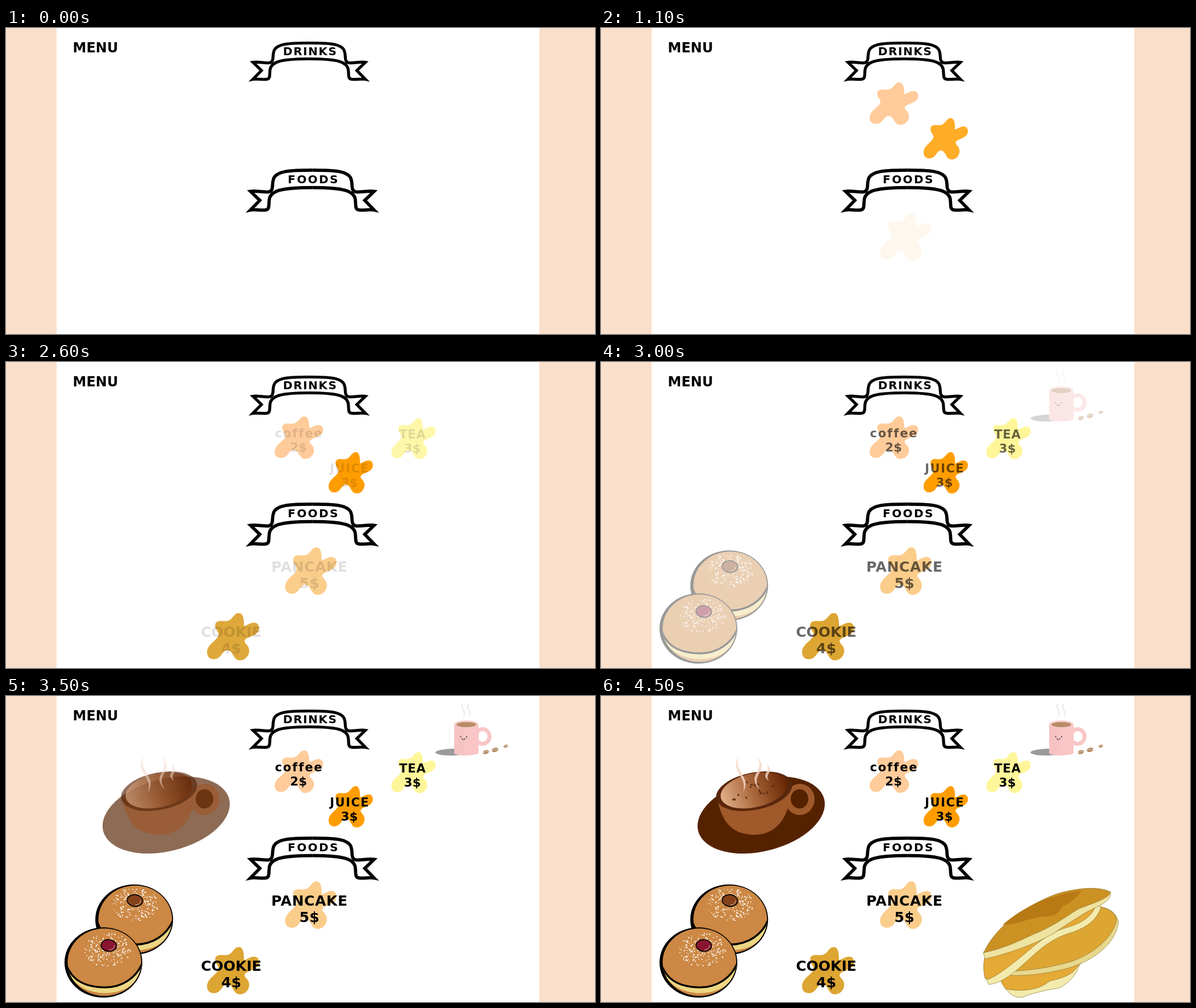
These frames come from a looping animation (1037 by 540 pixels, 5500 ms). An HTML page with a canvas:

```html
<!DOCTYPE html>
<html lang="en">
<head>
<meta charset="utf-8">
<title>Menu</title>
<style>
html, body { margin: 0; width: 100%; height: 100%; overflow: hidden; background: #fff; }
canvas { display: block; }
</style>
</head>
<body>
<canvas id="stage" width="1037" height="540"></canvas>
<script>
const W = 1037, H = 540, LOOP = 5500;
const stage = document.getElementById('stage').getContext('2d');
const TAU = Math.PI * 2;
const clamp = v => Math.max(0, Math.min(1, v));

function layer(draw) {
  const canvas = document.createElement('canvas');
  canvas.width = W;
  canvas.height = H;
  draw(canvas.getContext('2d'));
  return canvas;
}

function ellipse(c, color, x, y, rx, ry, angle = 0) {
  c.fillStyle = color;
  c.beginPath();
  c.ellipse(x, y, rx, ry, angle, 0, TAU);
  c.fill();
}

function stroke(c, color, path, width) {
  c.strokeStyle = color;
  c.lineWidth = width;
  c.stroke(new Path2D(path));
}

function shape(c, color, path, outline) {
  c.fillStyle = color;
  c.fill(new Path2D(path));
  if (outline) stroke(c, outline, path, 0.7);
}

function text(c, str, x, y, size, spacing = 0) {
  c.font = `bold ${size}px "DejaVu Sans", sans-serif`;
  c.textAlign = 'center';
  c.letterSpacing = spacing + 'px';
  c.fillStyle = '#000';
  c.fillText(str, x + spacing / 2, y);
}

function randomFrom(seed) {
  return () => (seed = (seed * 16807) % 2147483647) / 2147483647;
}

// Calls place(x, y, rand) for seeded random spots inside an ellipse.
function scatter(count, seed, rx, ry, power, place) {
  const rand = randomFrom(seed);
  for (let i = 0; i < count; i++) {
    const angle = rand() * TAU, reach = Math.pow(rand(), power);
    place(Math.cos(angle) * reach * rx, Math.sin(angle) * reach * ry, rand);
  }
}

// Right half of a ribbon; the left half is its mirror image.
const HALF_RIBBON = 'M0 3C30 3 60 3 62.5 19C65 26 61 36 70 38C78 39 90 35.5 99 37' +
  'L84 51.5L99 67C92 65.5 82 68 75 67C68 66 70 60 69 52C68.5 36 50 31 0 31';

function banner(c, title, x, y, scale, spacing) {
  for (const side of [-1, 1]) {
    c.save();
    c.translate(x, y);
    c.scale(side * scale, scale);
    stroke(c, '#000', HALF_RIBBON, 5.2);
    c.restore();
  }
  text(c, title, x + 1, y + 24 * scale, 20, spacing);
}

const backdrop = layer(c => {
  c.fillStyle = '#fff';
  c.fillRect(0, 0, W, H);
  c.fillStyle = '#fadfcb';
  c.fillRect(0, 0, 89, H);
  c.fillRect(939, 0, 98, H);
  text(c, 'MENU', 157.5, 43, 24);
  banner(c, 'DRINKS', 533.75, 23.5, 1, 1.6);
  banner(c, 'FOODS', 539.25, 247.5, 1.1, 2.4);
});

// Five-lobed splash in a 90 by 84 box
const SPLASH = 'M55 0C62 0 64 9 64 23C68 23 74 17 81 17C87 17 90 21 90 27C90 42 65 42 65 50' +
  'C65 55 73 57 73 67C73 76 66 84 57 84C44 84 46 66 35 66C26 66 25 82 12 82C4 82 0 77 0 70' +
  'C0 54 20 48 20 38C20 33 14 30 14 22C14 17 18 14 23 14C28 14 30 15 35 14C45 12 46 0 55 0Z';

const dishes = [
  { name: 'coffee', price: '2$', color: '#ffcb9a', x: 473, y: 96, w: 85.5, h: 75, from: 0, to: 600,
    textX: 515, textY: 133, size: 21, spacing: 1.9 },
  { name: 'JUICE', price: '3$', color: '#ff9d00', x: 568, y: 159, w: 78, h: 73, from: 300, to: 1250,
    textX: 604.5, textY: 195, size: 21, spacing: 1.5 },
  { name: 'PANCAKE', price: '5$', color: '#fbcd8b', x: 491.5, y: 327, w: 90.5, h: 84, from: 1000, to: 1700,
    textX: 534, textY: 369.5, size: 25, spacing: 0.6 },
  { name: 'COOKIE', price: '4$', color: '#dda532', x: 354, y: 443, w: 91.5, h: 83.5, from: 1500, to: 2650,
    textX: 396.5, textY: 485, size: 25, spacing: 0 },
  { name: 'TEA', price: '3$', color: '#fef699', x: 678.5, y: 99, w: 78, h: 72.5, from: 1900, to: 2750,
    textX: 715.5, textY: 135, size: 21, spacing: 0.8 }
];

for (const d of dishes) {
  d.image = layer(c => {
    c.translate(d.x, d.y);
    c.scale(d.w / 90, d.h / 84);
    shape(c, d.color, SPLASH);
  });
}

const labels = layer(c => {
  for (const d of dishes) {
    text(c, d.name, d.textX, d.textY, d.size, d.spacing);
    text(c, d.price, d.textX, d.textY + d.size * 1.17, d.size, 0.3);
  }
});

const mug = layer(c => {
  ellipse(c, '#9a9a9a', 787, 99, 31, 6, -0.02);
  c.lineCap = 'round';
  for (const x of [804, 814]) {
    stroke(c, '#e6e2e2', `M${x} 14c-6 9 6 11 1 24m0 -24c-6 9 6 11 2 20`, 1);
  }
  c.strokeStyle = '#f9c6c6';
  c.lineWidth = 7;
  c.beginPath();
  c.ellipse(839, 71.5, 12.3, 13, 0, 0, TAU);
  c.stroke();
  shape(c, '#f9c5c5', 'M789 49V100Q789 104 810 105Q832 104 832 100V49Z');
  shape(c, '#f6c2c1', 'M789 49V100Q789 104 807 105V49Z');
  ellipse(c, '#f9cfcf', 810.5, 49.5, 21.5, 6.5);
  ellipse(c, '#b98b68', 810.5, 50.5, 17.5, 4.5);
  for (const x of [800.5, 811]) ellipse(c, '#333', x, 72, 1.1, 1.1);
  stroke(c, '#333', 'M802.5 75q3 4 6 0', 1.1);
  for (const [x, y, r] of [[845, 99, 5.5], [861, 95, 6], [880, 88.5, 4]]) {
    ellipse(c, '#b08660', x, y, r, r * 0.6, -0.3);
    stroke(c, '#f3e4d4', `M${x - r + 1} ${y + 1}q${r} -3 ${2 * r - 2} -2`, 0.9);
  }
});

function bun(c, x, y, filling, fillingX, fillingY, sugarX, sugarY, seed) {
  const dome = 'M-66 2C-56 30-36 43 2 44C34 44 58 26 68 2';
  c.save();
  c.translate(x, y);
  ellipse(c, '#000', 0, 0, 68.5, 62);
  c.beginPath();
  c.ellipse(1.8, -0.5, 64.8, 59.5, 0, 0, TAU);
  c.clip();
  c.fillStyle = '#cc8844';
  c.fillRect(-70, -65, 140, 130);
  shape(c, '#ecd784', dome + 'V14C58 40 34 54 4 54C-30 54-54 38-66 12Z');
  stroke(c, '#000', dome, 3.4);
  scatter(240, seed, 41, 30, 0.6, (dx, dy, rand) => {
    const r = 0.6 + rand() * 0.6;
    ellipse(c, '#fff', sugarX + dx, sugarY + dy, r, r);
  });
  ellipse(c, '#000', fillingX, fillingY, 14.5, 11.2, 0.1);
  ellipse(c, filling, fillingX, fillingY, 12.8, 9.5, 0.1);
  c.lineCap = 'round';
  stroke(c, '#e3c3a8', `M${fillingX + 1} ${fillingY + 8}q9 -1 9 -8`, 1);
  c.restore();
}

const buns = layer(c => {
  bun(c, 225.7, 394.5, '#85421a', 1.3, -33.5, 2.5, -27, 71);
  bun(c, 171.5, 470.3, '#8a1530', 9.5, -30, 7.5, -22, 905);
});

// Tapering wisp that sways once on its way down.
function wisp(c, x, y, height, drift, sway) {
  c.fillStyle = '#f3d8c6';
  for (let s = 0; s <= 1; s += 0.5 / height) {
    const w = 0.5 + 4.5 * Math.sin(Math.PI * s);
    c.fillRect(x + drift * s - sway * Math.sin(TAU * s) - w / 2, y + height * s, w, 0.6);
  }
}

// Coffee cup: parts fade separately so they show through each other.
const cup = [
  c => ellipse(c, '#552200', 282, 210, 114.5, 63.8, -0.25),
  c => {
    ellipse(c, '#a0592a', 350, 182.5, 26, 27.5, 0.1);
    shape(c, '#a0592a', 'M205 182C212 215 224 244 270 245C306 244 332 220 335 160Z');
  },
  c => {
    ellipse(c, '#552200', 349.5, 181.5, 15.5, 17);
    ellipse(c, '#5a270c', 269.5, 168, 68, 33, -0.2);
  },
  c => {
    const coffee = c.createLinearGradient(213, 188, 322, 148);
    coffee.addColorStop(0, '#e2b08a');
    coffee.addColorStop(0.5, '#a8663a');
    coffee.addColorStop(1, '#6a2805');
    ellipse(c, coffee, 269, 166.5, 59.5, 30, -0.22);
  },
  c => {
    wisp(c, 241, 108, 60, 10, 4);
    wisp(c, 275, 107, 56, 3, -5);
    wisp(c, 292, 121, 28, 3, -3);
  }
].map(layer);

const crumbs = layer(c => {
  scatter(14, 37, 40, 18, 0.5, (dx, dy, rand) => {
    c.save();
    c.translate(266 + dx, 166 + dy - dx * 0.2);
    c.rotate(rand() * 3);
    c.fillStyle = '#5a260b';
    c.fillRect(-2, -1.2, 3 + rand() * 2, 2.4);
    c.restore();
  });
});

// Bottom of the stack first: cream rim, then browned face.
const pancakes = [
  { from: 3750, to: 4250, face: '#e5a935', rim: '#f3ebae',
    rimPath: 'M698 478C698 495 706 508 714 518Q724 533 741 532C765 522 790 518 808 515Q834 500 842 476Z',
    facePath: 'M698 476L757 436L880 440Q845 470 830 488Q815 498 790 503C770 520 740 522 712 517Q700 500 698 476Z' },
  { from: 3750, to: 4250, face: '#dda532', rim: '#e8d88e',
    rimPath: 'M880 372Q905 376 911 398C908 430 880 460 830 478C790 490 750 494 722 493L700 477L812 413Z',
    facePath: 'M880 372Q904 378 908 394C902 425 872 452 830 468C790 480 750 485 715 486L700 477L757 433L812 413Q826 380 880 372Z' },
  { from: 3800, to: 4300, face: '#e5a935', rim: '#f3ebae',
    rimPath: 'M862 368Q880 364 880 374C872 396 855 408 830 417C790 428 770 450 745 472C725 490 705 507 683 509L676 496Z',
    facePath: 'M676 498C670 470 676 450 690 438C730 395 790 360 830 362Q858 362 872 367C866 388 848 400 825 407C785 418 765 440 740 460C715 480 700 492 682 500Z' },
  { from: 4250, to: 4500, face: '#cb9122', rim: '#eee3a0',
    rimPath: 'M673 452L676 464C712 456 760 440 795 420C825 400 850 382 878 370Q900 358 897 346Z',
    facePath: 'M674 453C690 415 735 375 800 350C840 337 880 336 897 346C893 358 870 364 840 376C815 392 790 410 760 421C730 436 705 446 674 453Z',
    glaze: 'M707 404C745 370 795 350 846 343C836 360 822 366 812 372C800 392 790 388 770 390C745 396 730 403 707 404Z' }
];

for (const p of pancakes) {
  p.image = layer(c => {
    shape(c, p.rim, p.rimPath, '#8a7434');
    shape(c, p.face, p.facePath, '#8a7434');
    if (p.glaze) shape(c, '#b87a15', p.glaze);
  });
}

function render(time) {
  const step = time < 3000 ? 100 : 50;
  const t = Math.min(4500, Math.floor(time / step) * step);
  const show = (image, from, to) => {
    stage.globalAlpha = clamp((t - from) / (to - from));
    stage.drawImage(image, 0, 0);
  };
  stage.globalAlpha = 1;
  stage.drawImage(backdrop, 0, 0);
  for (const d of dishes) show(d.image, d.from, d.to);
  show(labels, 2500, 3350);
  show(mug, 2700, 3450);
  show(buns, 2700, 3450);
  for (const part of cup) show(part, 3200, 3650);
  const left = 1 - clamp((t - 3550) / 700);
  stage.globalAlpha = 1;
  stage.drawImage(crumbs, 0, -215 * left * left);
  for (const p of pancakes) show(p.image, p.from, p.to);
}

const start = performance.now();
function tick() {
  render((performance.now() - start) % LOOP);
  requestAnimationFrame(tick);
}
tick();
</script>
</body>
</html>
```
